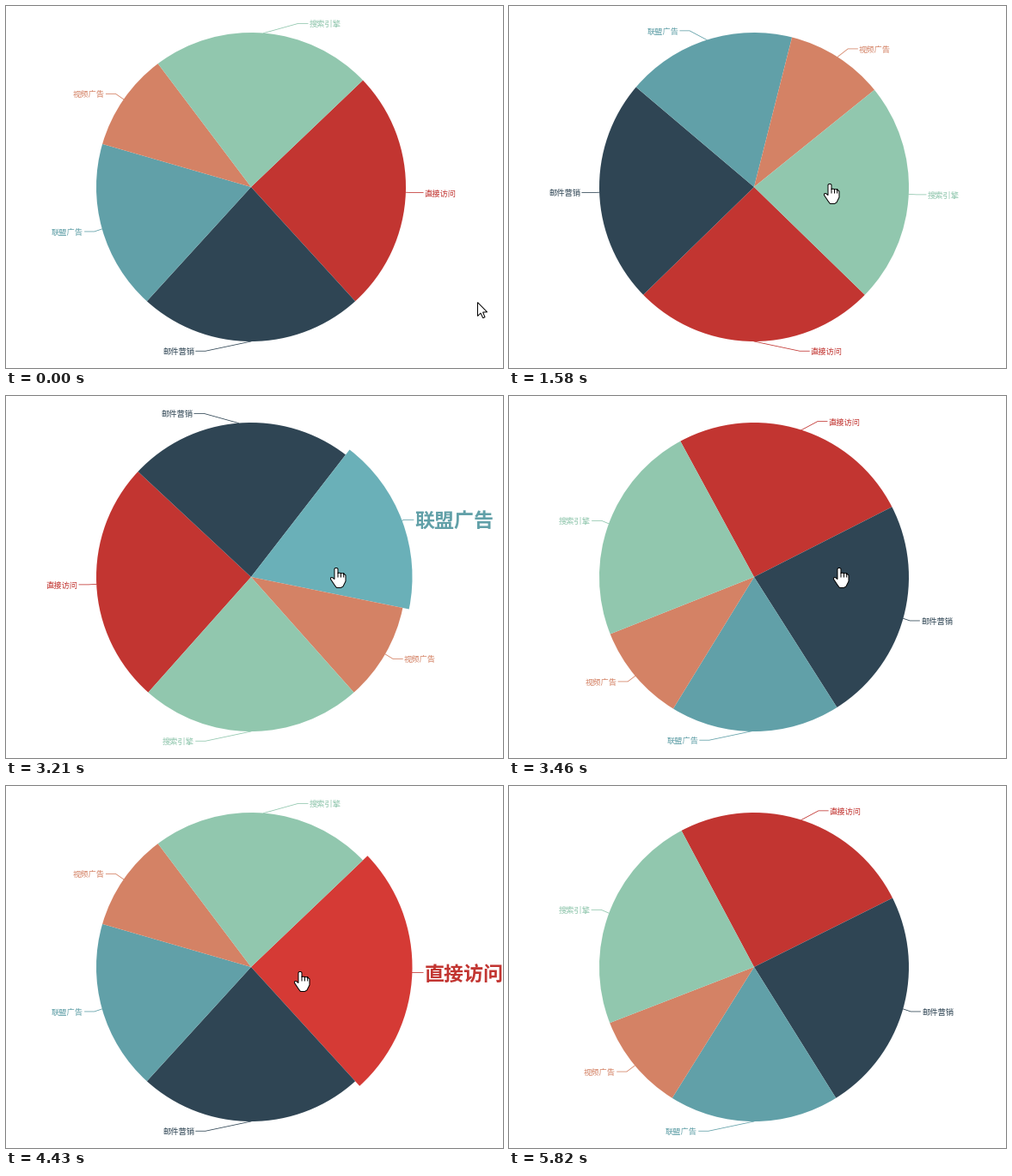
A matplotlib script for the animation above (6.1 s loop, 578 px wide and 422 px high).

```python
import numpy as np
import matplotlib.pyplot as plt
from matplotlib.animation import FuncAnimation
from matplotlib.patches import PathPatch, Wedge
from matplotlib.path import Path
from matplotlib.transforms import Affine2D

W, H, DPI = 578, 422, 100
LOOP, STEP = 6100, 20
PX = 72 / DPI

# The picture is refreshed once per beat; all times below are in beats.
BEATS = 45
BEAT = LOOP / BEATS
PHASE = 75             # ms by which the first beat is cut short
SUBSTEPS = 50
DURATION = 300 / BEAT

CENTER = CX, CY = np.array([285, 211])
R = 180
SWELL = 7.5            # extra radius of a hovered sector
LEAD = 11.25           # length of each label line segment
GAP = 2.25
SMALL, BIG = 9.25, 23  # label sizes in px

RED, DARK, TEAL, ORANGE, GREEN = range(5)
NAMES = ["直接访问", "邮件营销", "联盟广告", "视频广告", "搜索引擎"]
VALUES = np.array([335, 310, 234, 135, 305])
COLORS = ["#c23531", "#2f4554", "#61a0a8", "#d48265", "#91c7ae"]
LIT_COLORS = ["#d53a35", "#334b5c", "#6ab0b8", "#e98f6f", "#9fdabf"]

SPANS = VALUES / VALUES.sum() * 360
STARTS = np.cumsum(SPANS) - SPANS
MIDS = STARTS + SPANS / 2

CLICKS = [(9.14, RED), (17.14, GREEN), (24.14, TEAL), (29.14, DARK), (38.14, TEAL)]

# Pointer: first place, then (start, end, destination)
HOME = (548, 345)
MOVES = [(2.8, 7.2, (373, 207)), (21, 23, (384, 200)),
         (31, 38, (174, 280)), (39, 43, (226, 445))]


def lerp(a, b, p):
    return a + (b - a) * p


def smooth(k):
    k = np.clip(k, 0, 1)
    return k * k * (3 - 2 * k)


def cubic_out(k):
    return 1 - (1 - np.clip(k, 0, 1)) ** 3


def elastic_out(k):
    if k >= 1:
        return 1.0
    return 1 + 2 ** (-10 * k) * np.sin((k - 0.1) * 5 * np.pi)


def pointer_at(beat):
    spot = np.array(HOME)
    for start, end, goal in MOVES:
        spot = lerp(spot, np.array(goal), smooth((beat - start) / (end - start)))
    return spot


def sector_at(spot, bottom):
    dx, dy = spot - CENTER
    if np.hypot(dx, dy) > R:
        return None
    turn = (np.degrees(np.arctan2(dy, dx)) - 90 + MIDS[bottom]) % 360
    return int(np.searchsorted(STARTS, turn, side="right")) - 1


def label_layout(i, bottom):
    """Text anchor, side and line points of a label with one sector at the bottom."""
    a = np.radians(90 - MIDS[bottom] + MIDS[i])
    if i == bottom:
        side = 1 if i == RED else -1
    else:
        side = 1 if np.cos(a) > 0 else -1
    y = CY + (R + LEAD) * np.sin(a)
    x = CX + side * np.sqrt((R + 2 * LEAD) ** 2 - (y - CY) ** 2)
    end = x - side * GAP
    line = [(CX + R * np.cos(a), CY + R * np.sin(a)), (end - side * LEAD, y), (end, y)]
    return np.array([x, y]), side, np.array(line)


class Chart:
    """Pie that swings a clicked sector to the bottom and swells a hovered one."""

    def __init__(self):
        self.old = self.new = DARK
        self.since = -DURATION
        self.hovered = self.lit = None
        self.settled = set()
        self.swell = [(0, 0, 0, cubic_out)] * 5

    def fade(self, beat, ease):
        if self.lit is not None:
            self.swell[self.lit] = (1, 0, beat, ease)
        self.lit = None

    def hover(self, i, beat):
        if i == self.hovered:
            return
        self.fade(beat, elastic_out)
        # a hover change cuts short the swing of both sectors
        self.settled |= {self.hovered, i}
        if i is not None:
            self.swell[i] = (0, 1, beat, elastic_out)
        self.hovered = self.lit = i

    def click(self, i, beat):
        self.fade(beat, cubic_out)
        self.old, self.new, self.since = self.new, i, beat
        self.settled = set()
        self.hover(i, beat)

    def pose(self, beat):
        p = cubic_out((beat - self.since) / DURATION)
        radii = [R + SWELL * lerp(a, b, ease((beat - when) / DURATION))
                 for a, b, when, ease in self.swell]
        turns = [1 if i in self.settled else p for i in range(5)]
        return self.old, self.new, p, self.lit, turns, radii


def play():
    """Run the whole session and keep the pose at every beat."""
    chart, poses = Chart(), []
    for step in range(BEATS * SUBSTEPS + 1):
        beat = step / SUBSTEPS
        for when, i in CLICKS:
            if beat - 1 / SUBSTEPS < when <= beat:
                chart.click(i, when)
        if any(start < beat < end for start, end, _ in MOVES):
            chart.hover(sector_at(pointer_at(beat), chart.new), beat)
        if step % SUBSTEPS == 0:
            poses.append(chart.pose(beat))
    return poses


def shape(outline, strokes=()):
    """Closed outline plus open inner strokes as one path."""
    verts = list(outline) + [outline[0]]
    codes = [Path.MOVETO] + [Path.LINETO] * (len(outline) - 1) + [Path.CLOSEPOLY]
    for stroke in strokes:
        verts += stroke
        codes += [Path.MOVETO, Path.LINETO]
    return Path(verts, codes)


ARROW = shape([(0.5, 0.5), (0.5, 16.5), (4, 13), (6.7, 18.7), (9, 17.7),
               (6.6, 12), (11.6, 11.8)])
HAND = shape([(-2, 1.5), (-1, 0.5), (1, 0.5), (2, 1.5), (2, 6), (5.5, 6.5), (8.7, 7),
              (11, 9), (11, 16), (8, 22), (5.5, 23.5), (0.5, 23.5), (-1.5, 21),
              (-6.5, 13.5), (-6.3, 11.7), (-4.3, 11.6), (-2, 13.6)],
             [[(x, 6), (x, 11.5)] for x in (2, 5.5, 8.7)])

POSES = play()

fig = plt.figure(figsize=(W / DPI, H / DPI), dpi=DPI, facecolor="white")
ax = fig.add_axes([0, 0, 1, 1])
ax.set_xlim(0, W)
ax.set_ylim(H, 0)
ax.axis("off")

sectors, lines, labels = [], [], []
for name, color, span in zip(NAMES, COLORS, SPANS):
    sectors.append(ax.add_patch(Wedge((CX, CY), R, 0, span, lw=0, zorder=2)))
    lines += ax.plot([], [], color=color, lw=0.8 * PX, snap=False, zorder=1)
    labels.append(ax.text(0, 0, name, color=color, va="baseline", zorder=3,
                          fontfamily="Noto Sans CJK JP"))
pointer = ax.add_patch(PathPatch(ARROW, fc="white", ec="black", lw=PX, zorder=4))


def draw_sector(i, start, radius, is_lit):
    sectors[i].set(theta1=start, theta2=start + SPANS[i], radius=radius,
                   facecolor=(LIT_COLORS if is_lit else COLORS)[i])


def draw_label(i, old, new, p, is_lit):
    xy0, _, line0 = label_layout(i, old)
    xy1, side, line1 = label_layout(i, new)
    x, y = lerp(xy0, xy1, p)
    size = BIG if is_lit else SMALL
    labels[i].set(position=(x - side * 0.7, y + 0.42 * size), fontsize=size * PX,
                  fontweight="bold" if is_lit else "normal",
                  ha="left" if side > 0 else "right")
    lines[i].set_data(*lerp(line0, line1, p).T)


def draw_pointer(beat):
    spot = pointer_at(beat)
    inside = np.hypot(*(spot - CENTER)) < R
    pointer.set_path(HAND if inside else ARROW)
    pointer.set_transform(Affine2D().translate(*np.round(spot)) + ax.transData)


def update(n):
    beat = int((n * STEP + PHASE) / BEAT)
    old, new, p, lit, turns, radii = POSES[beat]
    for i in range(5):
        start = 90 - lerp(MIDS[old], MIDS[new], turns[i]) + STARTS[i]
        draw_sector(i, start, radii[i], i == lit)
        draw_label(i, old, new, p, i == lit)
    draw_pointer(beat)
    return sectors + lines + labels + [pointer]


anim = FuncAnimation(fig, update, frames=LOOP // STEP, init_func=lambda: update(0),
                     interval=STEP, repeat=True, repeat_delay=0, blit=False)
plt.show()
```
